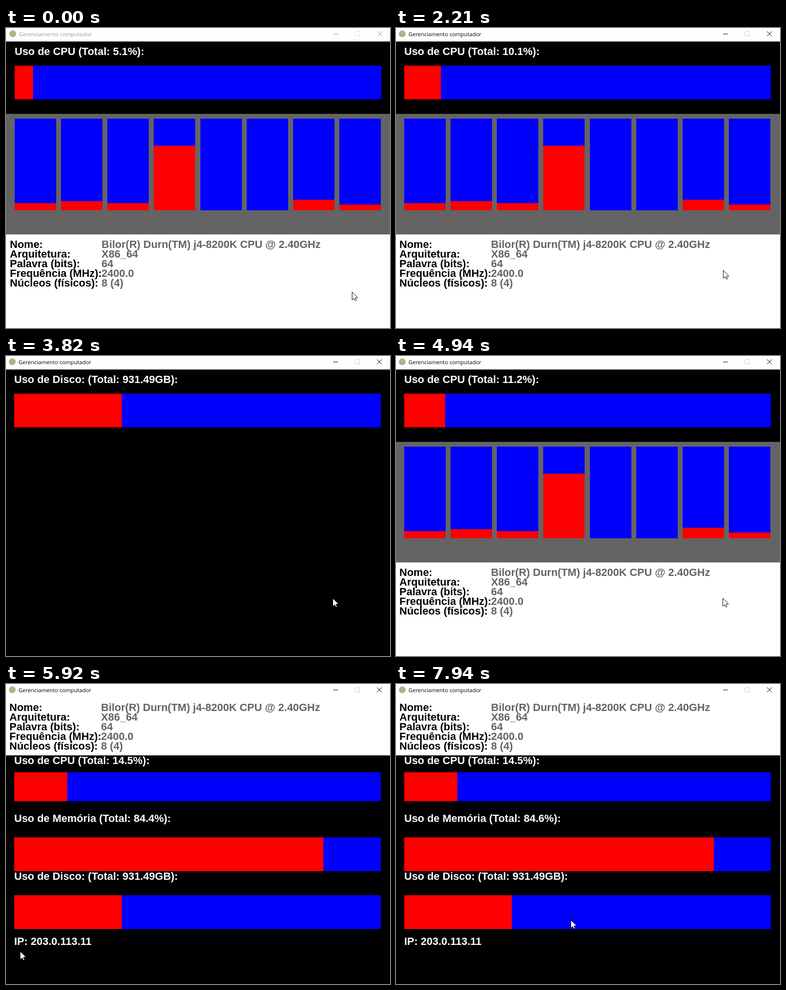
Recreate the animation shown at these times as an HTML page with a canvas. Size 796 px wide and 622 px high, loop 8 s.

```html
<!DOCTYPE html>
<html lang="pt">
<head>
<meta charset="utf-8">
<title>Gerenciamento computador</title>
<style>
html, body { margin: 0; width: 100%; height: 100%; overflow: hidden; background: #fff; }
canvas { display: block; }
</style>
</head>
<body>
<canvas id="stage" width="796" height="622"></canvas>
<script>
const ctx = document.getElementById('stage').getContext('2d');
const LOOP = 8000;
const RED = '#f00', BLUE = '#00f', GRAY = '#646464';
const LEFT = 17, BAR_W = 760;

const pages = { 0: 'cpu', 2460: 'memory', 3820: 'disk', 4940: 'cpu', 5920: 'summary' };
const cpu = { 0: 5.1, 620: 12.1, 1510: 10.1, 4940: 11.2, 5560: 14.5 };
const memory = { 0: 84.6, 3640: 84.4, 6500: 84.6 };
const coreLoad = [8, 10, 8, 71, 0, 0, 12, 6.5];

// Pointer moves: each glides to (x, y) in a few visible steps.
const home = { x: 716, y: 547 };
const moves = [
  { start: 50, gap: 66, steps: 4, x: 679, y: 502 },
  { start: 1780, gap: 1, steps: 1, x: 678, y: 502 },
  { start: 3640, gap: 1, steps: 1, x: 677, y: 502 },
  { start: 5560, gap: 100, steps: 2, x: 29, y: 554 },
  { start: 7300, gap: 80, steps: 2, x: -1, y: 538 },
  { start: 7460, gap: 80, steps: 2, x: 98, y: 517 },
  { start: 7790, gap: 75, steps: 3, x: 362, y: 489 }
];

const specs = {
  'Nome:': 'Bilor(R) Durn(TM) j4-8200K CPU @ 2.40GHz',
  'Arquitetura:': 'X86_64',
  'Palavra (bits):': '64',
  'Frequência (MHz):': '2400.0',
  'Núcleos (físicos):': '8 (4)'
};

function at(track, t) {
  const start = Object.keys(track).filter(s => s <= t).pop();
  return track[start];
}

function rect(x, y, w, h, color) {
  ctx.fillStyle = color;
  ctx.fillRect(x, y, w, h);
}

function label(text, x, y, color) {
  ctx.font = 'bold 22px "Liberation Sans", Arial, sans-serif';
  ctx.fillStyle = color;
  ctx.fillText(text, x, y);
}

function meter(text, percent, baseline, top, height = 70) {
  label(text, LEFT, baseline, '#fff');
  rect(LEFT, top, BAR_W, height, BLUE);
  rect(LEFT, top, Math.floor(BAR_W * percent / 100), height, RED);
}

function cpuMeter(t, baseline, top, height) {
  const p = at(cpu, t);
  meter(`Uso de CPU (Total: ${p}%):`, p, baseline, top, height);
}

function memoryMeter(t, baseline, top) {
  const p = at(memory, t);
  meter(`Uso de Memória (Total: ${p}%):`, p, baseline, top);
}

function diskMeter(baseline, top) {
  meter('Uso de Disco: (Total: 931.49GB):', 29.4, baseline, top);
}

function specList(y) {
  for (const [name, value] of Object.entries(specs)) {
    label(name, 7, y, '#000');
    label(value, 197, y, GRAY);
    y += 20;
  }
}

const draw = {
  cpu(t) {
    cpuMeter(t, 56, 78);
    rect(-2, 178, 800, 250, GRAY);
    coreLoad.forEach((load, i) => {
      const x = Math.floor(LEFT + i * 96.25);
      const h = Math.floor(190 * load / 100);
      rect(x, 188, 86, 190, BLUE);
      rect(x, 378 - h, 86, h, RED);
    });
    rect(-2, 428, 800, 194, '#fff');
    specList(456);
  },
  memory(t) {
    memoryMeter(t, 56, 78);
  },
  disk() {
    diskMeter(56, 78);
  },
  summary(t) {
    rect(-2, 28, 800, 120, '#fff');
    specList(56);
    cpuMeter(t, 166, 183, 60);
    memoryMeter(t, 286, 318);
    diskMeter(406, 438);
    label('IP: 203.0.113.11', LEFT, 541, '#fff');
  }
};

function titleBar(t) {
  const shade = t < 2110 ? 150 : t < 2210 ? 75 : 0;
  const ink = `rgb(${shade},${shade},${shade})`;
  rect(-2, 0, 800, 28, '#fff');

  ctx.fillStyle = '#b9ae84';
  ctx.beginPath();
  ctx.arc(13, 12, 7, 0, Math.PI * 2);
  ctx.fill();

  ctx.font = '11.4px "Open Sans", "Noto Sans", sans-serif';
  ctx.fillStyle = ink;
  ctx.fillText('Gerenciamento computador', 26, 17);

  rect(678, 12, 10, 1, ink);
  ctx.lineWidth = 1;
  ctx.strokeStyle = shade ? '#e0e0e0' : '#ccc';
  ctx.strokeRect(723.5, 7.5, 9, 9);
  ctx.strokeStyle = ink;
  ctx.beginPath();
  ctx.moveTo(769, 7);
  ctx.lineTo(779, 17);
  ctx.moveTo(779, 7);
  ctx.lineTo(769, 17);
  ctx.stroke();
}

function pointerAt(t) {
  let { x, y } = home;
  for (const m of moves) {
    if (t < m.start) break;
    const p = Math.min(1, (Math.floor((t - m.start) / m.gap) + 1) / m.steps);
    const ease = p * (2 - p);
    x += (m.x - x) * ease;
    y += (m.y - y) * ease;
  }
  return [Math.round(x), Math.round(y)];
}

// Crisp arrow built row by row: black edge, white core.
function cursor(x, y) {
  const span = (dx, row, w, core = w - 2) => {
    rect(x + dx, y + row, w, 1, '#000');
    if (core > 0) rect(x + dx + 1, y + row, core, 1, '#fff');
  };
  for (let row = 0; row < 12; row++) span(0, row, row + 1);
  span(0, 12, 12, 6);
  for (let row = 13; row < 18; row++) {
    if (row < 17) span(0, row, 18 - row);
    span(4 + (row - 13 >> 1), row, 4);
  }
  span(7, 18, 2);
}

function frame(now) {
  const t = now % LOOP;
  rect(0, 0, 796, 622, '#000');
  ctx.save();
  ctx.translate(t < 870 ? 1 : 0, 0);
  draw[at(pages, t)](t);
  titleBar(t);
  cursor(...pointerAt(t));
  ctx.restore();
}

const begin = performance.now();
function tick() {
  frame(performance.now() - begin);
  requestAnimationFrame(tick);
}
tick();
</script>
</body>
</html>
```
